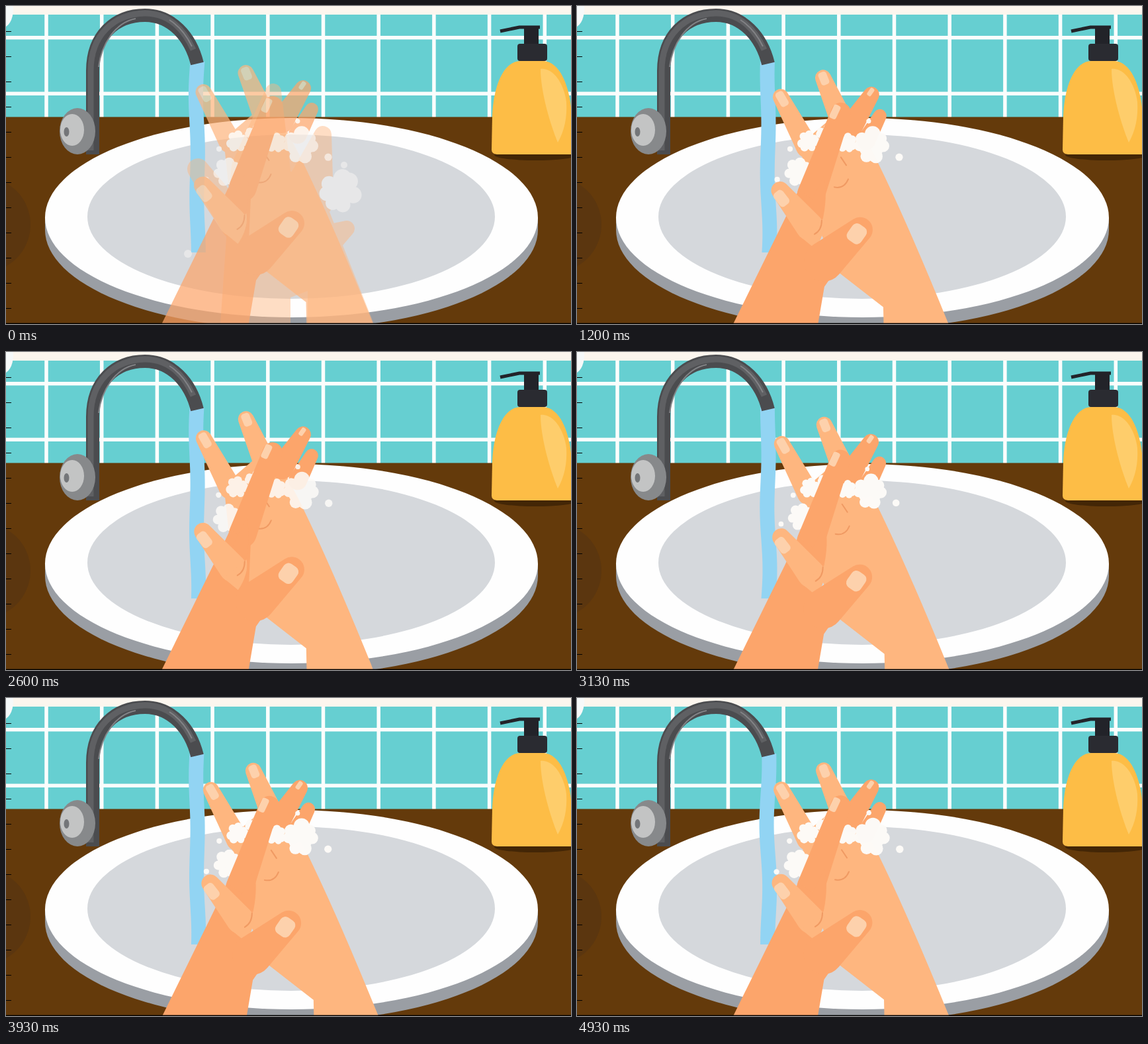
These frames come from a looping animation (854 by 480 pixels, 4990 ms). An HTML page:

```html
<!DOCTYPE html>
<html lang="en">
<head>
<meta charset="utf-8">
<title>Washing hands</title>
<style>
  html, body { margin: 0; width: 100%; height: 100%; overflow: hidden; background: #643a0b; }
  svg { display: block; width: 854px; height: 480px; }
  .skin { fill: #feb67f; }
  .front { fill: #fca56b; }
  .nail { fill: #fdd1ac; }
  .foam { fill: #fdfbf8; }
  .crease { fill: none; stroke: #f09a63; stroke-width: 2; stroke-linecap: round; }
</style>
</head>
<body>
<svg viewBox="0 0 854 480">
  <!-- wall and counter -->
  <rect width="854" height="168" fill="#66cfd1"/>
  <path id="grout" stroke="#fbfdfc" stroke-width="5.5"/>
  <rect width="854" height="13" fill="#fcf6ee"/>
  <rect y="167.5" width="854" height="313" fill="#643a0b"/>
  <circle cx="-35" cy="330" r="72" fill="#5b360f"/>

  <!-- sink -->
  <path d="M59 320V338A372.5 150 0 0 0 804 338V320Z" fill="#9a9ea4"/>
  <ellipse cx="431.5" cy="319.5" rx="372.5" ry="150.5" fill="#fefefe"/>
  <ellipse cx="431" cy="318" rx="308" ry="124" fill="#d5d8dc"/>

  <path id="water" fill="#92d4f3"/>

  <!-- tap -->
  <g fill="none">
    <path d="M131 224V98C131 45 165 14 210 14C250 14 279 46 289 87" stroke="#4b4c4f" stroke-width="20"/>
    <path d="M128 218V98C128 44 163 12 210 11C244 11 268 33 283 66" stroke="#5f6063" stroke-width="9"/>
    <path d="M140 92C144 58 165 25 196 19M247 21Q268 34 281 61" stroke="#828386" stroke-width="2"/>
  </g>
  <ellipse cx="108" cy="189" rx="27" ry="35" fill="#87898b"/>
  <ellipse cx="100" cy="187" rx="18" ry="24" fill="#c3c4c4"/>
  <ellipse cx="91.5" cy="190" rx="4" ry="7" fill="#747679"/>

  <!-- soap bottle -->
  <ellipse cx="800" cy="225" rx="62" ry="8" fill="#432606"/>
  <path d="M734 217L735 165C737 120 752 84 777 83H813C839 85 853 125 855 165V224H742Q734 223 734 217Z" fill="#fdbd46"/>
  <path d="M808 95C826 93 843 115 847 145Q849 180 834 206C823 180 808 130 808 95Z" fill="#fecd6b"/>
  <path d="M747 38L776 32H807" fill="none" stroke="#222329" stroke-width="5"/>
  <rect x="783" y="30" width="22" height="40" fill="#222329"/>
  <rect x="773" y="57" width="45" height="26" rx="4" fill="#2a2b31"/>

  <g id="ghost"></g>
  <g id="hands"></g>

  <!-- slide edges -->
  <ellipse cx="-6" cy="5" rx="17" ry="28" fill="#f6f9f9"/>
  <path id="ticks" stroke="#000"/>
  <rect y="478.6" width="854" height="1.4"/>
</svg>
<script>
const LOOP = 4990, STEP = LOOP / 75, RUB = 880, PULSE = 1200, FADE = 400;
const $ = id => document.getElementById(id);
const wave = (t, period) => Math.cos(2 * Math.PI * t / period);
const repeat = (n, part) => Array.from({ length: n }, (_, i) => part(i)).join('');

let seed = 7;
const random = () => (seed = seed * 16807 % 2147483647) / 2147483647;

const shape = (kind, d) => `<path class="${kind}" d="${d}"/>`;
const dot = (x, y, r) => `<circle class="foam" cx="${x}" cy="${y}" r="${r}"/>`;
const nail = (x, y, w, h, turn) =>
  `<rect class="nail" x="${-w / 2}" y="${-h / 2}" width="${w}" height="${h}" rx="${w / 3}" transform="translate(${x} ${y}) rotate(${turn})"/>`;

// outline around two circles: the tip and the root of a finger
function finger(kind, x1, y1, r1, x2, y2, r2) {
  const a = Math.atan2(y2 - y1, x2 - x1);
  const b = Math.acos((r1 - r2) / Math.hypot(x2 - x1, y2 - y1));
  const at = (x, y, r, angle) => `${x + r * Math.cos(angle)} ${y + r * Math.sin(angle)}`;
  const wide = +(b < Math.PI / 2);
  return shape(kind, `M${at(x1, y1, r1, a + b)}A${r1} ${r1} 0 ${wide} 1 ${at(x1, y1, r1, a - b)}
    L${at(x2, y2, r2, a - b)}A${r2} ${r2} 0 ${1 - wide} 1 ${at(x2, y2, r2, a + b)}Z`);
}

// a cloud of bubbles: one in the middle, seven around it
function puff(x, y, r) {
  return dot(x, y, r * 0.7) + repeat(7, i => {
    const angle = i * 2 * Math.PI / 7 + random() * 0.5;
    return dot(x + r * 0.64 * Math.cos(angle), y + r * 0.64 * Math.sin(angle), r * (0.3 + random() * 0.14));
  });
}

$('grout').setAttribute('d', repeat(10, i => `M${61 + 83.7 * i} 13V168`) + repeat(2, i => `M0 ${47.8 + 84.4 * i}H854`));
$('ticks').setAttribute('d', repeat(12, i => `M0 ${38.5 + 38 * i}H8`));

$('hands').innerHTML = `
  <g class="back">
    ${finger('skin', 310, 139, 12, 350, 214, 17)}${nail(312, 142, 13, 24, -30)}
    ${finger('skin', 374, 110, 12, 400, 170, 17)}${nail(375, 111, 13, 20, -22)}
    ${shape('skin', 'M358 195L385 172L432 190L453 230Q500 325 563 480L571 502H466L465 456L398 404L350 300L342 225Z')}
    ${shape('crease', 'M391 275Q406 278 412 263M401 230L409 242')}
  </g>
  <g class="fore">
    ${finger('front', 457, 168, 10, 436, 206, 14)}
    ${finger('front', 444, 136, 12, 412, 186, 18)}${nail(443, 132, 7, 13, 35)}
  </g>
  <g id="foam">
    ${puff(351, 205, 16)}${puff(377, 194, 14)}${puff(407, 207, 15)}${puff(444, 211, 27)}${puff(336, 250, 21)}
    ${dot(324, 216, 4)}${dot(485, 228, 5.5)}${dot(305, 261, 4)}${dot(440, 175, 3.5)}
  </g>
  <g class="fore">
    ${finger('front', 398, 163, 15, 353, 286, 21)}${nail(389, 162, 11, 22, 25)}
    ${shape('front', 'M216 521L314 322L334 280L365 300L362 367L380 416L373 426L360 502Z')}
  </g>
  <g class="back">
    ${shape('front', 'M375 258Q382 290 372 330L345 320Z')}
    ${finger('skin', 309, 280, 13.5, 354, 335, 21)}
    ${shape('skin', 'M340 350L362 368Q378 345 375 322Z')}${nail(311, 292, 17, 25, -38)}
    ${shape('crease', 'M372 325Q372 340 361 346')}
  </g>
  <g class="fore">
    ${finger('front', 427, 340, 19, 372, 388, 30)}${nail(422, 346, 25, 29, 35)}
  </g>`;

$('ghost').innerHTML =
  finger('skin', 404, 129, 12, 385, 250, 45) + finger('skin', 290, 246, 16, 350, 330, 25) +
  finger('skin', 479, 194, 13, 455, 290, 40) + finger('skin', 515, 336, 12, 440, 380, 40) +
  shape('skin', 'M324 480L340 250H465L556 480H456V430L430 440V480Z') +
  puff(505, 280, 32) + dot(511, 240, 5) + dot(275, 374, 6);

function waterPath(t) {
  const side = (x, dir) => repeat(49, i => {
    const y = dir > 0 ? 84 + 6 * i : 372 - 6 * i;
    const sway = 1.5 * Math.sin(y / 27 - t / 106) + Math.sin(y / 47 + 1);
    return `L${x + sway} ${y}`;
  });
  return 'M278 84' + side(278, 1) + side(300, -1) + 'Z';
}

function move(name, x, y) {
  for (const el of document.querySelectorAll(name)) el.setAttribute('transform', `translate(${x} ${y})`);
}

function draw(t) {
  const up = (1 + wave(t, RUB)) / 2;
  move('.back', -11.5 * up, -9 * up);
  move('.fore', 5 * up, -12 * up);

  const grow = 1 + 0.035 * wave(t - 150, PULSE);
  $('foam').setAttribute('transform', `translate(404 222) scale(${grow}) translate(-404 -222)`);
  $('foam').setAttribute('opacity', 1 - 0.14 * up);
  $('water').setAttribute('d', waterPath(t));

  const shown = Math.min(1, t / FADE);
  $('hands').setAttribute('opacity', 0.72 + 0.28 * shown);
  $('ghost').setAttribute('opacity', 0.45 * (1 - shown));
}

const start = performance.now();
function tick() {
  const t = (performance.now() - start) % LOOP;
  draw(Math.floor((t + 5) / STEP) % 75 * STEP);
  requestAnimationFrame(tick);
}
tick();
</script>
</body>
</html>
```
